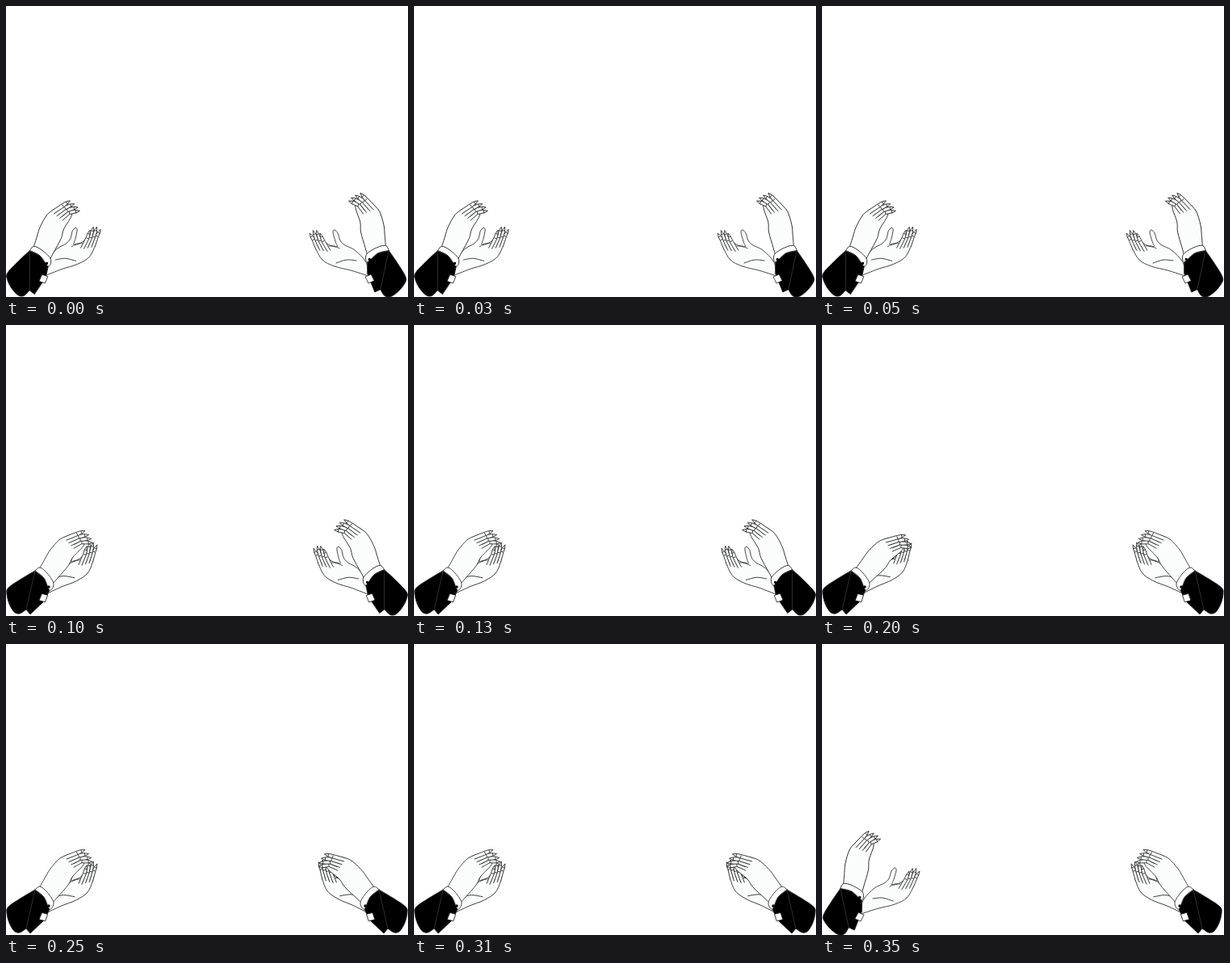
Recreate the animation shown at these times as an HTML page with a canvas. Size 498 by 360 pixels, loop 0.4 s.

```html
<!DOCTYPE html>
<html lang="en">
<head>
<meta charset="utf-8">
<title>Clapping hands</title>
<style>
html, body { margin: 0; width: 100%; height: 100%; overflow: hidden; background: #fff; }
canvas { display: block; width: 498px; height: 360px; }
</style>
</head>
<body>
<canvas id="stage" width="498" height="360"></canvas>
<script>
const ctx = document.getElementById('stage').getContext('2d');
const INK = '#262626', SKIN = '#fbfdfd', SLOT = 50;

// Degrees the upper arm has swung down, from wide open to shut.
const swings = [0, 12.5, 25, 31];
const CLOSED_ARM = 25;
const leftBeat = '11223220', rightBeat = '00112332';

function paint(fill) {
  if (fill) {
    ctx.fillStyle = fill;
    ctx.fill();
  }
  ctx.stroke();
}

// Smooth curve through every point.
function curve(list, fill) {
  const at = i => list[Math.max(0, Math.min(list.length - 1, i))];
  ctx.beginPath();
  ctx.moveTo(...list[0]);
  for (let i = 0; i < list.length - 1; i++) {
    const [a, b, c, d] = [at(i - 1), at(i), at(i + 1), at(i + 2)];
    ctx.bezierCurveTo(b[0] + (c[0] - a[0]) / 6, b[1] + (c[1] - a[1]) / 6,
      c[0] - (d[0] - b[0]) / 6, c[1] - (d[1] - b[1]) / 6, ...c);
  }
  paint(fill);
}

function poly(list, fill) {
  ctx.beginPath();
  list.forEach(p => ctx.lineTo(...p));
  ctx.closePath();
  paint(fill);
}

function turned(x, y, degrees, body) {
  ctx.save();
  ctx.translate(x, y);
  ctx.rotate(degrees * Math.PI / 180);
  ctx.translate(-x, -y);
  body();
  ctx.restore();
}

// Tapered finger with a pointed nail and a short knuckle line.
function finger(base, knuckle, tip, w) {
  const dx = tip[0] - knuckle[0], dy = tip[1] - knuckle[1], len = Math.hypot(dx, dy);
  const side = (p, k) => [p[0] - dy / len * k, p[1] + dx / len * k];
  const nail = [tip[0] - dx / len * 5, tip[1] - dy / len * 5];
  ctx.beginPath();
  [side(base, w), side(knuckle, w), side(nail, w * 0.8), tip,
    side(nail, -w * 0.8), side(knuckle, -w), side(base, -w)].forEach(p => ctx.lineTo(...p));
  paint(SKIN);
  ctx.beginPath();
  for (const p of [knuckle, nail]) {
    ctx.moveTo(...side(p, w * 0.8));
    ctx.lineTo(...side(p, -w * 0.5));
  }
  ctx.stroke();
}

function fan(place) {
  for (let i = 3; i >= 0; i--) finger(...place(i / 3));
}

function lowerHand() {
  curve([[48, 334], [51, 317], [65, 302], [77, 296], [83, 290], [86, 281], [90, 277],
    [92, 280], [89, 291], [87, 298], [98, 295], [106, 289], [115, 293], [106, 313],
    [90, 322], [70, 327], [48, 334]], SKIN);
  fan(u => [
    [97 + 14 * u, 303 - 2 * u],
    [104 + 12 * u, 291 - 2 * u],
    [108 + 13 * u, 281 - 4 * Math.sin(Math.PI * u)],
    2
  ]);
  curve([[63, 315], [75, 314], [88, 318]]);
  curve([[84, 300], [90, 297], [97, 297]]);
}

function upperHand() {
  curve([[41, 302], [49, 288], [55, 278], [67, 265], [80, 260], [92, 258], [97, 271],
    [83, 287], [77, 298], [64, 313], [58, 320]], SKIN);
  fan(u => [
    [74 + 10 * u, 264 + 10 * u],
    [88 + 6 * u, 258.5 + 10 * u],
    [98 + 9 * Math.sin(u * Math.PI / 2), 254.5 + 15 * u],
    2.3
  ]);
}

function sleeve() {
  curve([[36, 304], [19, 314], [3, 325], [1, 333], [4, 345], [10, 355], [17, 357], [25, 352]], '#000');
  poly([[36, 304], [25, 352], [30, 358], [48, 341], [54, 328], [47, 313]], '#000');
  curve([[36, 304], [42, 300], [51, 307], [59, 320], [54, 328], [47, 313], [36, 304]], '#fff');
  ctx.beginPath();
  ctx.arc(53, 324, 1.7, 0, Math.PI * 2);
  ctx.fillStyle = '#000';
  ctx.fill();
}

function lowerCuff() {
  poly([[45, 332], [52, 335], [48, 343], [41, 340]], '#fff');
}

function pair(swing) {
  const arm = Math.min(swing, CLOSED_ARM);
  const low = -0.3 * swing;
  turned(47, 338, low, lowerHand);
  turned(26, 333, arm - CLOSED_ARM, () => {
    turned(50, 310, swing - arm, upperHand);
    sleeve();
  });
  turned(47, 338, low, lowerCuff);
}

function draw(slot) {
  const slide = Math.max(0, 2 - (slot + 1) % 8);
  ctx.setTransform(1, 0, 0, 1, 0, 0);
  ctx.fillStyle = '#fff';
  ctx.fillRect(0, 0, 498, 360);
  ctx.strokeStyle = INK;
  ctx.lineWidth = 0.85;
  ctx.lineJoin = ctx.lineCap = 'round';
  pair(swings[leftBeat[slot]]);
  ctx.setTransform(-1, 0, 0, 1, 498 - slide, 0);
  pair(swings[rightBeat[slot]]);
}

const start = performance.now();
function tick() {
  draw(Math.floor((performance.now() - start) / SLOT) % leftBeat.length);
  requestAnimationFrame(tick);
}
tick();
</script>
</body>
</html>
```
